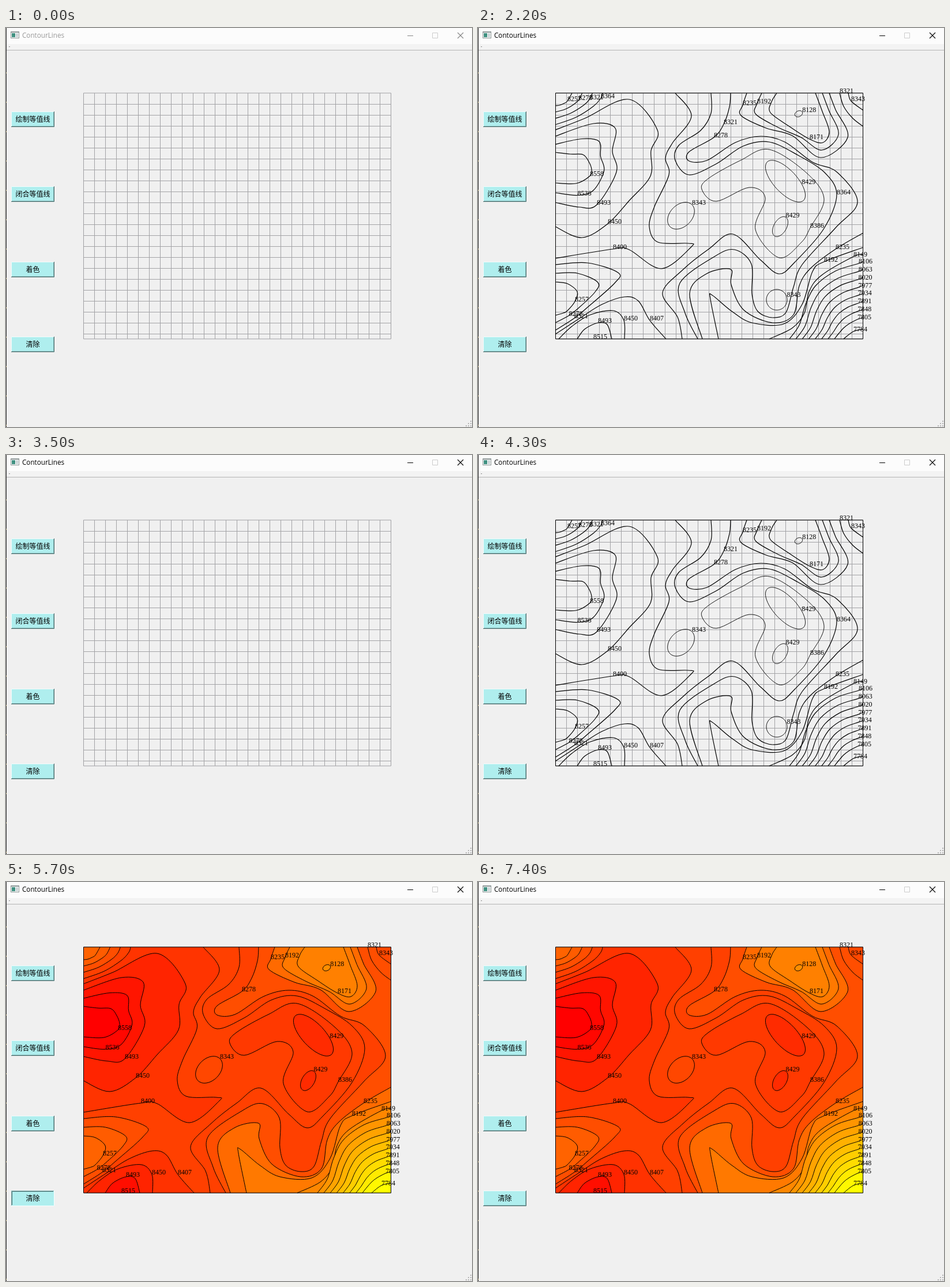
Animation, 808 px wide and 693 px high, one loop 8 s. Source, as an HTML page:

```html
<!DOCTYPE html>
<html lang="zh">
<head>
<meta charset="utf-8">
<title>ContourLines</title>
<style>
  html, body { margin: 0; width: 100%; height: 100%; overflow: hidden; background: #f0f0f0; }
  svg { display: block; }
  .title { font: 11.7px "Open Sans", "Noto Sans", sans-serif; }
  .btn { font: 12px "Noto Sans CJK SC", "Noto Sans CJK", sans-serif; text-anchor: middle; }
  .label { font: 12px "Liberation Serif", "Noto Serif", serif; }
</style>
</head>
<body>
<svg id="stage" width="808" height="693" viewBox="0 0 808 693"></svg>
<script>
const NS = 'http://www.w3.org/2000/svg';
const LOOP = 8000;
const L = 134, T = 113, R = 667.5, B = 540;
const stage = document.getElementById('stage');

function el(tag, attrs, parent = stage, text) {
  const e = document.createElementNS(NS, tag);
  for (const k in attrs) e.setAttribute(k, attrs[k]);
  if (text) e.textContent = text;
  parent.append(e);
  return e;
}
const rect = (x, y, width, height, fill) => el('rect', { x, y, width, height, fill });
const path = (d, stroke, width, parent, fill = 'none') =>
  el('path', { d, stroke, 'stroke-width': width, fill, 'stroke-linejoin': 'round' }, parent);
const label = (x, y, text, parent) => el('text', { x, y, class: 'label' }, parent, String(text));
const show = (e, on) => e.setAttribute('visibility', on ? 'visible' : 'hidden');

function pointsOf(text) {
  const n = text.split(' ').map(Number), p = [];
  for (let i = 0; i < n.length; i += 2) p.push([n[i], n[i + 1]]);
  return p;
}

// Smooth curve through key points
function spline(p, loop) {
  const n = p.length;
  const at = i => loop ? p[(i + n) % n] : p[Math.max(0, Math.min(n - 1, i))];
  const pull = (a, b, c) => [0, 1].map(k => (a[k] + (b[k] - c[k]) / 6).toFixed(1));
  let d = 'M' + p[0];
  for (let i = 0; i < (loop ? n : n - 1); i++) {
    const a = at(i), b = at(i + 1);
    d += `C${pull(a, b, at(i - 1))} ${pull(b, a, at(i + 2))} ${b}`;
  }
  return d + (loop ? 'Z' : '');
}

// tag and under map a point's index to its label; under is hidden by the colours
const curve = (level, text, opt) => ({ level, pts: pointsOf(text), ...opt });

// Evenly spaced curves between two key curves, one for each level
function family(levels, from, to, at, opt = {}) {
  const a = pointsOf(from), b = pointsOf(to);
  return levels.map((level, i) => {
    const k = i / (levels.length - 1);
    const pts = a.map((p, j) => p.map((v, c) => v + (b[j][c] - v) * k));
    return { level, pts, [opt.kind || 'tag']: { [at[i] ?? at[0]]: level }, ...opt };
  });
}

function oval(level, cx, cy, rx, ry, deg, opt) {
  const r = deg * Math.PI / 180, pts = [];
  for (let i = 0; i < 12; i++) {
    const u = rx * Math.cos(i * Math.PI / 6), v = ry * Math.sin(i * Math.PI / 6);
    pts.push([cx + u * Math.cos(r) - v * Math.sin(r), cy + u * Math.sin(r) + v * Math.cos(r)]);
  }
  return { level, pts, loop: true, tag: { 0: level }, ...opt };
}

const steps43 = (from, n) => Array.from({ length: n }, (_, i) => from - 43 * i);

// ends: frame corners that close an open curve
const curves = [
  curve(8400, '342 113 370 153 337 200 325 226 331 255 306 310 297 345 312 372 364 374 370 380 318 418 262 385 234 384 134 400',
    { ends: 'nw', tag: { 12: 8400 } }),
  curve(8450, '134 177 185 157 262 124 311 177 300 213 299 257 262 300 225 340 180 364 134 345', { tag: { 7: 8450 } }),
  ...family([8493, 8536, 8558],
    '134 188 200 166 238 174 233 214 240 250 206 307 175 311 134 303',
    '134 216 160 219 182 220 192 232 197 246 194 257 170 270 134 269', [5, 6, 5]),
  ...family([8364, 8321, 8278, 8257],
    '134 168 170 155 200 136 213 122 216 113',
    '134 135 142 134 149 131 155 127 163 113', [3], { ends: 'nw', kind: 'under' }),

  curve(8364, '404 113 404 148 386 178 348 204 342 230 366 255 413 236 460 205 505 198 555 221 600 250 622 289 600 348 550 406 522 427 490 403 442 358 400 384 355 420 320 460 346 502 354 540',
    { ends: 'se ne', under: { 11: 8364 } }),
  curve(8321, '438 113 436 137 426 167 409 190 366 215 366 231 397 230 446 199 490 188 532 198 580 233 622 250 658 302 620 347 562 411 547 450 534 494 511 503 485 492 475 462 474 410 445 385 410 397 350 443 359 495 381 540',
    { ends: 'se ne', tag: { 3: 8278 }, under: { 2: 8321 } }),
  curve(8386, '505 211 455 230 400 261 388 280 413 301 470 277 498 295 481 350 522 399 560 373 576 347 600 297 570 252',
    { loop: true, tag: { 10: 8386 } }),
  oval(8343, 352, 326, 27, 19, -45),
  oval(8429, 533, 266, 46, 20, 47, { tag: { 10: 8429 } }),
  oval(8429, 524, 345, 19, 11, -60),
  oval(8343, 518, 472, 18, 18, -15, { bare: true, tag: {}, under: { 0: 8343 } }),

  ...family([8235, 8192, 8171],
    '466 113 459 134 456 152 500 174 545 187 594 225 641 190 620 142 609 113',
    '518 113 509 128 507 147 540 171 575 193 598 199 609 180 597 145 585 113', [1, 1, 4]),
  oval(8128, 556, 149, 7, 5, -25),
  curve(8321, '627 113 634 136 650 157 668 171', { ends: 'ne', tag: { 0: 8321 } }),
  curve(8343, '642 113 647 127 668 143', { ends: 'ne', tag: { 1: 8343 } }),

  ...family([8321, 8278, 8257],
    '134 411 190 408 243 425 237 443 190 485 167 504 134 525',
    '134 441 155 444 172 458 168 475 155 491 148 495 134 499', [5, 5, 3]),
  curve(8407, '134 532 175 505 215 480 254 467 278 474 298 508 326 540', { ends: 'sw', tag: { 5: 8407 } }),
  curve(8450, '140 540 163 518 195 498 235 491 253 508 254 540', { tag: { 4: 8450 } }),
  curve(8515, '172 540 185 523 208 512 224 515 232 540', { tag: { 2: 8493 } }),

  curve(8235, '389 540 367 461 396 427 438 419 439 446 461 490 511 512 547 498 557 448 576 418 620 384 668 356',
    { ends: 'se', tag: { 10: 8235 } }),
  curve(8192, '417 540 403 471 406 464 440 492 475 512 530 514 562 480 580 423 600 406 668 381',
    { ends: 'se', tag: { 8: 8192 } }),
  curve(8149, '505 540 545 521 566 495 574 458 595 430 651 397 668 393', { ends: 'se', tag: { 5: 8149 } }),
  ...family(steps43(8106, 8),
    '540 540 557 516 568 480 585 448 620 422 660 409 668 405',
    '618 540 626 530 634 521 643 514 650 510 658 506 668 503', [5], { ends: 'se' }),
  curve(7784, '634 540 651 527 668 523', { ends: 'se', tag: { 1: 7784 } }),
];

const corner = { nw: [L, T], ne: [R, T], se: [R, B], sw: [L, B] };
const tint = level => `rgb(255,${Math.round(255 * (8558 - level) / 774)},0)`;
const frame = (stroke, parent, fill) =>
  path(`M${L + .5} ${T}H${R}V${B}H${L + .5}Z`, stroke, 1, parent, fill);

// Window
rect(0, 0, 808, 28, '#fcfcfc');
rect(0, 28, 808, 10, '#f3f3f3');
rect(0, 38, 808, 1, '#b4b4b4');
rect(5, 32, 2, 1, '#888');
rect(0, 0, 1, 693, '#2b2b2b');
for (let y = 77; y < 693; y += 51) rect(0, y, 1, 2, '#a3905c');
rect(8, 6, 15, 12, '#8a9494');
rect(9, 8, 13, 9, '#fff');
rect(10, 9, 6, 7, '#3f9080');
rect(17, 9, 4, 7, '#c9d3d6');
const title = el('text', { x: 28, y: 17, class: 'title' }, stage, 'ContourLines');
path('M739.5 8.5h9v9h-9z', '#ccc', 1);
const controls = path('M696 13.5h10M783 8l10 10M793 8l-10 10', '#000', 1.1);
for (let r = 0; r < 3; r++)
  for (let c = 0; c <= r; c++) rect(805 - c * 4, 682 + r * 4, 2, 2, '#b5b5b5');

// Buttons
const buttons = ['绘制等值线', '闭合等值线', '着色', '清除'].map((text, i) => {
  const y = Math.round(145 + i * 130.3);
  const up = el('g', {}), down = el('g', {});
  const edge = (inset, light, dark, parent) => {
    const x0 = 9.5 + inset, x1 = 83.5 - inset, y0 = y + .5 + inset, y1 = y + 26.5 - inset;
    path(`M${x0} ${y1}V${y0}H${x1}`, light, 1, parent);
    path(`M${x0 - .5} ${y1}H${x1}V${y0 - .5}`, dark, 1, parent);
  };
  for (const g of [up, down]) el('rect', { x: 9, y, width: 75, height: 27, fill: '#afeeee' }, g);
  edge(1, '#afeeee', '#82b2b2', up);
  edge(0, '#f0fcfc', '#4a6c6c', up);
  edge(1, '#4a6c6c', '#afeeee', down);
  edge(0, '#82b2b2', '#f4ffff', down);
  el('text', { x: 46.5, y: y + 18, class: 'btn' }, stage, text);
  return { up, down };
});

// Grid
const grid = el('g', {});
const cell = 19.04;
let lines = '';
for (let i = 1; i < 28; i++) lines += `M${Math.floor(L + i * cell) + .5} ${T}V${B}`;
for (let i = 1; i < 23; i++) lines += `M${L} ${Math.floor(T + i * cell) + .5}H${R}`;
path(lines, '#a3a3a6', 1, grid);
frame('#a0a0a4', grid);

// Contours, plain and coloured
const raw = el('g', {}), notes = el('g', {}), fill = el('g', {});
frame('none', fill, tint(8364));
for (const c of curves) {
  const d = spline(c.pts, c.loop);
  path(d, '#000', c.loop ? .9 : 1.2, raw);
  if (c.bare) continue;
  const close = (c.ends || '').split(' ').map(k => corner[k] ? 'L' + corner[k] : '').join('');
  path(d + close + 'Z', 'none', 0, fill, tint(c.level));
  path(d, '#000', 1, fill);
}
frame('#000', notes);
frame('#000', fill);
for (const { pts, tag, under } of curves) {
  const put = (map, parent) => {
    for (const i in map) label(...pts[i], map[i], parent);
  };
  put(tag, notes);
  put(under, notes);
  put(tag, fill);
}
for (const g of [notes, fill]) label(200, B, 8515, g);

// Start time, scene, pressed button
const steps = [
  [0, 'grid'], [1400, 'grid', 0], [1500, 'raw', 0], [1600, 'raw'],
  [2200, 'lines'], [2800, 'fill'], [3500, 'grid'], [4300, 'lines'],
  [4900, 'fill'], [5700, 'fill', 3], [5800, 'grid'],
  [6500, 'grid', 1], [6600, 'lines', 1], [6700, 'lines'],
  [7200, 'lines', 2], [7300, 'fill', 2], [7400, 'fill'],
];

function draw() {
  const t = performance.now() % LOOP;
  const [, scene, pressed] = steps.filter(s => s[0] <= t).pop();
  const active = t >= 1000;
  title.setAttribute('fill', active ? '#000' : '#999');
  controls.setAttribute('stroke', active ? '#000' : '#858585');
  show(raw, scene === 'raw' || scene === 'lines');
  show(notes, scene === 'lines');
  show(fill, scene === 'fill');
  buttons.forEach((b, i) => {
    show(b.up, i !== pressed);
    show(b.down, i === pressed);
  });
  requestAnimationFrame(draw);
}
draw();
</script>
</body>
</html>
```
